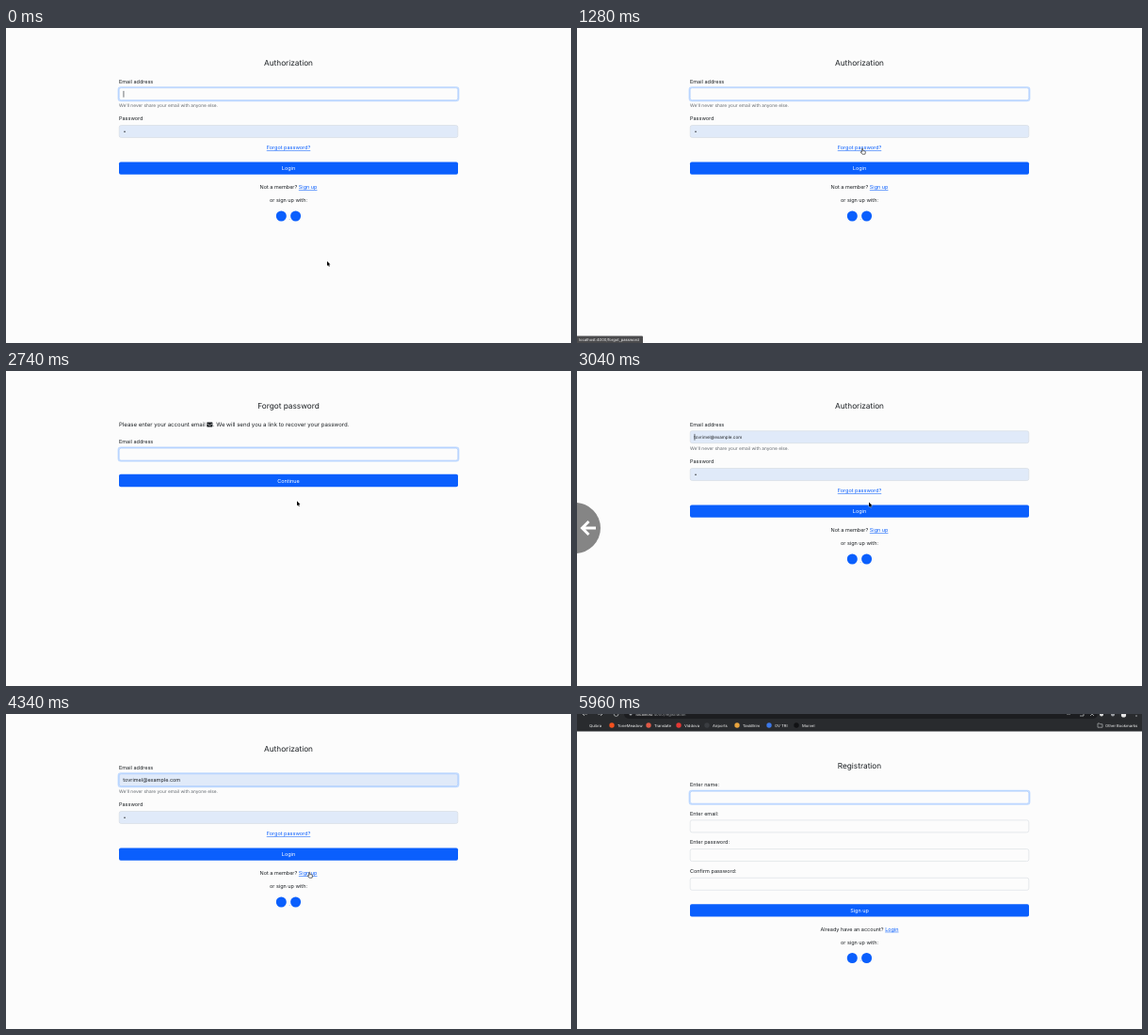
An HTML page for the animation above (6000 ms loop, 600x335 px).

```html
<!DOCTYPE html>
<html lang="en">
<head>
<meta charset="utf-8">
<title>Login flow</title>
<style>
  html, body { margin: 0; width: 100%; height: 100%; overflow: hidden; background: #fcfcfc; }
  svg { display: block; width: 100vw; height: 100vh; }
  text { font: 5.5px Inter, "Open Sans", sans-serif; fill: #1c2024; text-rendering: geometricPrecision; white-space: pre; }
  .title { font-size: 8.26px; }
  .lead { font-size: 6.05px; }
  .help { font-size: 4.82px; fill: #646a70; }
  .preview { font-size: 4.6px; }
  .mid { text-anchor: middle; }
  .link { fill: #0a5ffd; text-decoration: underline; }
  .white { fill: #fff; }
  .small { font-size: 4.15px; fill: #f2f2f2; }
</style>
</head>
<body>
<svg id="stage" viewBox="0 0 600 335"></svg>
<script>
const BLUE = '#0a5ffd', HOVER = '#0a50d6', BAR = 18.5;
const stage = document.getElementById('stage');

const text = (x, y, body, cls = '') => `<text x="${x}" y="${y}" class="${cls}">${body}</text>`;
const rect = (x, y, w, h, fill, more = '') => `<rect x="${x}" y="${y}" width="${w}" height="${h}" fill="${fill}" ${more}/>`;
const dot = (x, y, r, fill) => `<circle cx="${x}" cy="${y}" r="${r}" fill="${fill}"/>`;
const group = (id, body) => `<g id="${id}">${body}</g>`;
const link = body => `<tspan class="link">${body}</tspan>`;
const title = body => text(300, 39.7, body, 'title mid');
const label = (y, body) => text(120, y + 2, body);

// Form controls are placed by the y of their middle.
const field = (y, focus, fill = '#fcfcfc') =>
  (focus ? rect(119.3, y - 7.3, 361.4, 14.6, 'none', 'rx="2.6" stroke="#c2dbff" stroke-width="1.4"') : '') +
  rect(120.2, y - 6.5, 359.6, 13, fill, `rx="2" stroke="${focus ? '#86b7fe' : '#ced4da'}" stroke-width=".5"`);
const button = (y, body) =>
  rect(120, y - 6.7, 360, 13.4, BLUE, 'rx="1.8" class="button"') + text(300, y + 2, body, 'mid white');
const providers = y =>
  text(300, y - 14.7, 'or sign up with:', 'mid') + dot(292.3, y, 5.5, BLUE) + dot(307.6, y, 5.5, BLUE) +
  rect(300.6, y + 3, 1.4, .4, BLUE, 'opacity=".6"');

const FILLED = '#e0eaf9', EMAIL = 'tovrimel@example.com';
const login = (focus, fill, email) =>
  title('Authorization') + label(56.5, 'Email address') + field(70.2, focus, fill) + email +
  text(120, 84, 'We\'ll never share your email with anyone else.', 'help') +
  label(96.3, 'Password') + field(110, false, FILLED) + dot(126, 110.2, .75, '#1c2024') +
  text(300, 129, link('Forgot password?'), 'mid') + button(149.1, 'Login') +
  text(300, 171.1, 'Not a member? ' + link('Sign up'), 'mid') + providers(200);

const pages = {
  empty: login(true, '#fcfcfc', ''),
  preview: login(false, FILLED, text(124.3, 72, EMAIL, 'preview')),
  filled: login(true, FILLED, text(124.3, 72.2, EMAIL)),
  forgot: title('Forgot password') +
    text(120, 59.2, 'Please enter your account email', 'lead') +
    rect(213.2, 54.5, 6.2, 4.9, '#1c2024', 'rx=".7"') +
    '<path d="M213.2 55.9l3.1 2 3.1-2" fill="none" stroke="#fcfcfc" stroke-width=".6"/>' +
    text(219.8, 59.2, '. We will send you a link to recover your password.', 'lead') +
    label(74.7, 'Email address') + field(88.6, true) + button(116.5, 'Continue'),
  register: title('Registration') +
    ['name', 'email', 'password'].map((name, i) =>
      label(56.5 + i * 30.7, `Enter ${name}:`) + field(70.2 + i * 30.7, i === 0)).join('') +
    label(148.6, 'Confirm password:') + field(162.3) + button(190.4, 'Sign up') +
    text(300, 212.2, 'Already have an account? ' + link('Login'), 'mid') + providers(241)
};

const bookmarks = [
  [13, 'Quibra'], [43, 'ToneMeadow', '#f4511e'], [82, 'Translate', '#e05a47'], [114, 'Viddova', '#e53935'],
  [144, 'Airports', '#3a3d41'], [176, 'TaskBrim', '#e8a33d'], [210, 'OV TRI', '#3c78e8'], [239, 'Morvel', '#111214']
];
const toolbar =
  rect(0, 0, 600, BAR, '#292b2e') + rect(50, -6, 503, 11, '#1c1d20', 'rx="5"') +
  '<path d="M6 0h5M8 -2l-2 2 2 2M22 0h5M25 -2l2 2-2 2M44 0a2.4 2.4 0 1 1-4.8 0M520 0h4M534 2h4v-4M545 2l2-2 2 2" fill="none" stroke="#c8cacc" stroke-width=".7"/>' +
  dot(557, .5, 2, '#dcdcdc') + dot(569, .5, 2, '#9da0a4') + dot(580.5, 1, 2.6, '#e8e8e8') + dot(594, 2, .7, '#c8cacc') +
  dot(57, 0, 1.5, '#9da0a4') +
  text(62.5, 1.8, 'localhost<tspan fill="#9da0a4">:4000/registration</tspan>', 'small') +
  bookmarks.map(([x, name, color]) =>
    (color ? dot(x - 6, 12, 2.7, color) : '') + text(x, 13.6, name, 'small')).join('') +
  '<path d="M553 10h2l.7.8h2.3v3.4h-5z" fill="none" stroke="#c8cacc" stroke-width=".6"/>' +
  text(561, 13.6, 'Other Bookmarks', 'small');

const status = (width, fill, body) => rect(-2, 327.5, width + 2, 9, fill, 'rx="1"') + text(2, 333, body, 'small');

stage.innerHTML =
  rect(0, 0, 600, 335, '#fcfcfc') +
  group('content', Object.entries(pages).map(([id, body]) => group(id, body)).join('') +
    group('caret', rect(124.6, 0, .7, 6.8, '#33383d'))) +
  group('forgotUrl', status(70, '#4b4b4d', 'localhost:4000/forgot_password')) +
  group('waiting', status(200, '#a3a3a3', 'Waiting for mediasava.ru...')) +
  group('registerUrl', status(62, '#4b4b4d', 'localhost:4000/registration')) +
  group('swipe', dot(-2, 167, 27, '#858585') +
    '<path d="M20 167H6M12.5 160l-7 7 7 7" fill="none" stroke="#fff" stroke-width="3"/>') +
  group('toolbar', toolbar) +
  group('arrow', '<path d="M0 0v4.9l1.1-1 .8 1.8 .9-.4-.8-1.7h1.5z" fill="#000" stroke="#fff" stroke-width=".5" paint-order="stroke"/>') +
  group('hand', '<path d="M-.5 0q.5-.5 1 0v2l2 .5q.8.2.7 1l-.4 2.2h-3l-1.8-2q0-.8.9-.5l.6.5z" fill="#fff" stroke="#111" stroke-width=".6"/>');

const el = Object.fromEntries([...stage.querySelectorAll('[id]')].map(node => [node.id, node]));
const loginButton = el.empty.querySelector('.button');

// Start time, page, time at which the caret starts to blink.
const scenes = [
  [0, 'empty', -180], [1460, 'forgot', 1600], [2960, 'preview', 3020], [3220, 'filled', 3220], [4400, 'register', 4420]
];
const pointer = [
  [200, 341, 248], [800, 318, 135], [960, 303, 128.2], [1250, 303, 128.2], [1560, 309, 138.3], [2740, 309, 138.3],
  [3020, 310, 139.6], [3360, 310, 139.6], [3650, 316, 206], [3960, 322.3, 168.5], [5160, 322.3, 168.5], [5260, 395, -8]
];

const show = (node, on) => node.style.display = on ? '' : 'none';
const move = (node, x, y) => node.setAttribute('transform', `translate(${x} ${y})`);
const within = (t, from, to) => t >= from && t < to;
const ease = (t, from, to) => {
  const p = Math.min(1, Math.max(0, (t - from) / (to - from)));
  return p * p * (3 - 2 * p);
};

function pointerAt(t) {
  let [, x, y] = pointer[0];
  for (let i = 1; i < pointer.length; i++) {
    const p = ease(t, pointer[i - 1][0], pointer[i][0]);
    x += (pointer[i][1] - pointer[i - 1][1]) * p;
    y += (pointer[i][2] - pointer[i - 1][2]) * p;
  }
  return [x, y];
}

function draw(t) {
  const [, page, blink] = scenes.filter(scene => scene[0] <= t).pop();
  for (const id in pages) show(el[id], id === page);
  show(el.caret, t < blink || Math.floor((t - blink) / 200) % 2 === 0);
  move(el.caret, 0, page === 'forgot' ? 85.2 : 66.9);

  const [x, y] = pointerAt(t);
  const hand = within(t, 880, 1460) || within(t, 3940, 5160);
  show(el.hand, hand);
  show(el.arrow, !hand);
  move(hand ? el.hand : el.arrow, x, y);
  loginButton.setAttribute('fill', within(y, 142.4, 155.8) ? HOVER : BLUE);

  show(el.forgotUrl, within(t, 880, 1460));
  show(el.waiting, within(t, 1460, 1620));
  show(el.registerUrl, within(t, 3980, 4300));

  show(el.swipe, within(t, 2740, 3340));
  move(el.swipe, -28 * (1 - ease(t, 2740, 2940) + ease(t, 3100, 3340)), 0);

  const drop = BAR * ease(t, 5400, 5620);
  move(el.content, 0, drop);
  move(el.toolbar, 0, drop - BAR);
  show(el.toolbar, drop > 0);
}

const start = performance.now();
function loop() {
  draw((performance.now() - start) % 6000);
  requestAnimationFrame(loop);
}
loop();
</script>
</body>
</html>
```
